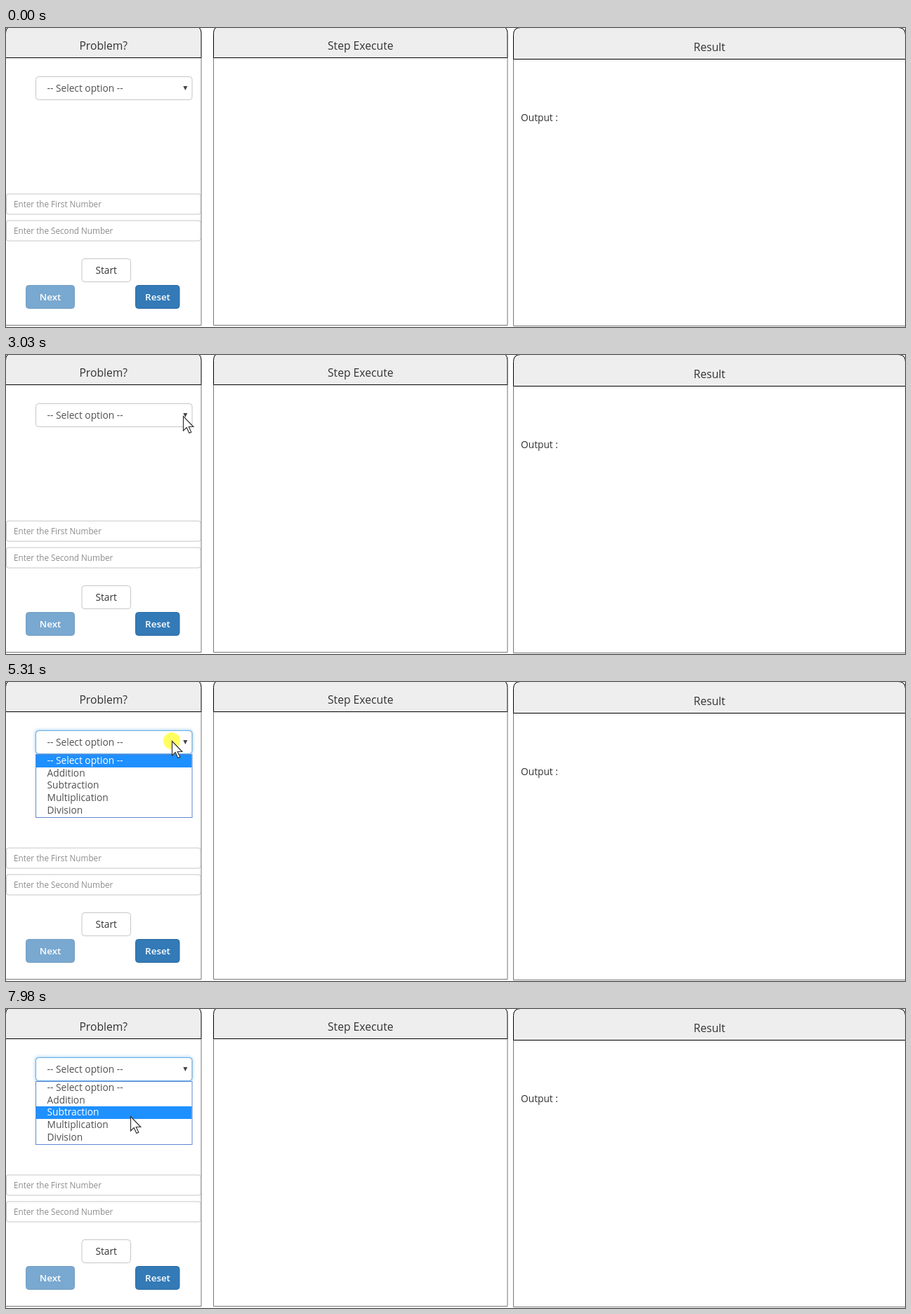
Recreate the animation shown at these times as an HTML page. Size 1280 by 427 pixels, loop 8 s.

```html
<!DOCTYPE html>
<html lang="en">
<head>
<meta charset="utf-8">
<title>Step Execute</title>
<style>
  html, body { margin: 0; width: 100%; height: 100%; overflow: hidden; background: #fff; }
  svg { display: block; width: 1280px; height: 427px; font: 13.75px "Open Sans", "Noto Sans", sans-serif; }
  text { fill: #333; white-space: pre; }
  .head { font-size: 15.7px; text-anchor: middle; }
  .hint { font-size: 11.7px; font-weight: 500; fill: #8c8c8c; }
  .field { fill: #fff; stroke: #c6c6c6; }
  .btn { fill: #337ab7; stroke: #2e6da4; }
  .btn + text { font-size: 13.4px; font-weight: 600; fill: #fff; }
  .mid { text-anchor: middle; }
  .opt { fill: #505050; }
  .panel { fill: none; stroke: #777; }
  .cap { fill: #eee; stroke: #000; }
  #tip text { font-size: 11.5px; fill: #575757; }
</style>
</head>
<body>
<svg viewBox="0 0 1280 427">
  <defs>
    <filter id="glow" x="-10%" y="-50%" width="120%" height="200%"><feGaussianBlur stdDeviation="2.6"/></filter>
  </defs>
  <g id="panels"></g>

  <rect class="field" x=".5" y="237" width="276.5" height="29" rx="3"/>
  <text class="hint" x="11" y="255.5">Enter the First Number</text>
  <rect class="field" x=".5" y="275" width="276.5" height="29" rx="3"/>
  <text class="hint" x="11" y="293.5">Enter the Second Number</text>

  <rect class="field" x="108" y="329.5" width="69.5" height="33" rx="4"/>
  <text class="mid" x="142.7" y="351">Start</text>
  <g opacity=".65">
    <rect class="btn" x="28.5" y="367.5" width="69" height="33" rx="4"/>
    <text class="mid" x="63" y="389">Next</text>
  </g>
  <rect class="btn" x="184.5" y="367.5" width="62.5" height="33" rx="4"/>
  <text class="mid" x="216" y="389">Reset</text>
  <text x="733" y="132.5">Output :</text>

  <rect id="halo" x="42" y="69" width="223" height="34" rx="4" fill="#66afe9" filter="url(#glow)"/>
  <rect class="field" x="42.5" y="69.5" width="222.5" height="33" rx="4"/>
  <rect id="ring" x="42.5" y="69.5" width="222.5" height="33" rx="4" fill="none" stroke="#66afe9"/>
  <text class="opt" x="58.5" y="91">-- Select option --</text>
  <path d="M252.3 83h6l-3 6z" fill="#444"/>

  <g id="list">
    <rect x="42.5" y="103.5" width="222.5" height="90" fill="#fff" stroke="#5f86d3"/>
    <rect id="bar" x="43" width="221.5" height="18" fill="#1e90ff"/>
  </g>

  <g id="tip">
    <rect x="252.5" y="115.5" width="177" height="18" fill="#fff" stroke="#767676"/>
    <text x="257" y="128.5">Please select an item in the list.</text>
  </g>
  <circle id="click" r="12" fill="#ff0" opacity=".62"/>
  <path id="cursor" d="M.5 .5V21l4.7-4.4 3.6 7.9 3-1.4-3.6-7.6h6.6z" fill="#fff" stroke="#333" stroke-width="1.2"/>
</svg>
<script>
const LOOP = 8000, STEP = 75;          // ms per loop, ms per cursor step
const ROW = 17.7, LIST_TOP = 104;

const $ = id => document.getElementById(id);
const show = (id, on) => $(id).style.display = on ? '' : 'none';
const within = (t, spans) => spans.some(([a, b]) => t >= a && t < b);

function add(parent, tag, attrs, label = '') {
  const el = document.createElementNS('http://www.w3.org/2000/svg', tag);
  for (const k in attrs) el.setAttribute(k, attrs[k]);
  el.textContent = label;
  return parent.appendChild(el);
}

function panel(title, left, right, top, bottom) {
  const base = top + 45, g = $('panels');
  add(g, 'path', { class: 'panel', d: `M${left} ${base}V${bottom}H${right}V${base}` });
  add(g, 'path', { class: 'cap', d: `M${left} ${base}V${top + 10}q0-10 10-10H${right - 10}q10 0 10 10V${base}z` });
  add(g, 'text', { class: 'head', x: (left + right) / 2, y: top + 33.5 }, title);
}
panel('Problem?', -.5, 278, -2.5, 424.5);
panel('Step Execute', 295.5, 714, -2.5, 424.5);
panel('Result', 722.5, 1280.5, -.5, 425.5);

const options = ['-- Select option --', 'Addition', 'Subtraction', 'Multiplication', 'Division']
  .map((name, i) => add($('list'), 'text', { class: 'opt', x: 58.5, y: 117 + i * ROW }, name));

// each move begins and ends at a time and reaches a point
const move = (from, to, x, y) => ({ from, to, x, y });
const path = [
  move(530, 680, 775, 322),
  move(1000, 1230, 374, 176),
  move(1460, 1610, 224, 87),
  move(1860, 2010, 252, 87),
  move(3810, 4050, 226, 12),
  move(4130, 4130, 226, 36),
  move(4950, 5080, 236, 84),
  move(6950, 7020, 261, 89),
  move(7400, 7670, 200, 142),
  move(7900, 7980, 177, 153)
];
const clicks = [[2170, 2490], [3130, 3270], [5310, 5510], [6010, 6270]];
const opened = [[5080, 5410], [6720, LOOP]];

function cursorAt(t) {
  let x = 1123, y = 416;
  for (const m of path) {
    if (t < m.from) break;
    const steps = Math.round((m.to - m.from) / STEP) + 1;
    const gap = (m.to - m.from) / (steps - 1) || 1;
    const k = Math.min(1, (Math.floor((t - m.from) / gap + 1e-6) + 1) / steps);
    x += (m.x - x) * k;
    y += (m.y - y) * k;
  }
  return [Math.round(x), Math.round(y)];
}

function draw(t) {
  const [x, y] = cursorAt(t);
  for (const id of ['cursor', 'click']) $(id).setAttribute('transform', `translate(${x} ${y})`);
  show('cursor', t >= path[0].from);
  show('click', within(t, clicks));
  show('tip', within(t, [[2250, 2400]]));

  const focus = Math.max(0, Math.min(1, (t - 3810) / 150));
  $('halo').style.opacity = focus * .8;
  $('ring').style.opacity = focus;

  show('list', within(t, opened));
  const row = Math.max(0, Math.floor((y - LIST_TOP) / ROW));
  $('bar').setAttribute('y', Math.round(LIST_TOP + row * ROW));
  options.forEach((el, i) => el.style.fill = i === row ? '#fff' : '');
}

const start = performance.now();
function tick() {
  draw((performance.now() - start) % LOOP);
  requestAnimationFrame(tick);
}
tick();
</script>
</body>
</html>
```
